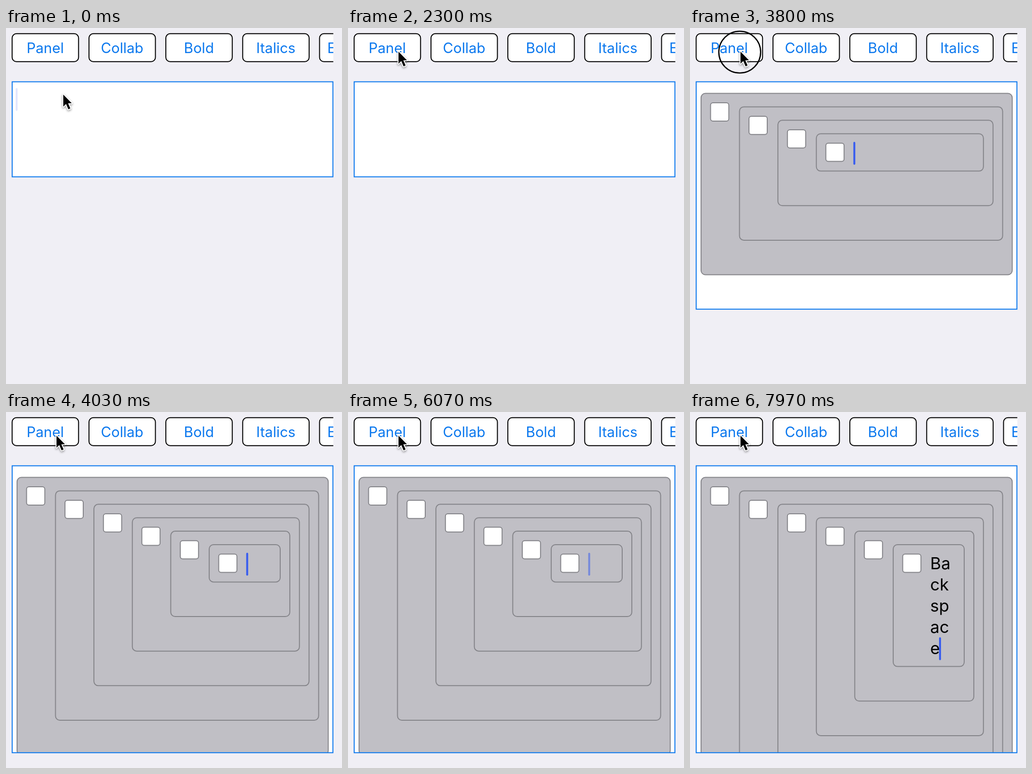
Recreate the animation shown at these times as an HTML page with a canvas. Size 696 by 738 pixels, loop 8 s.

```html
<!DOCTYPE html>
<html lang="en">
<head>
<meta charset="utf-8">
<title>Nested panels</title>
<style>
  html, body { margin: 0; width: 100%; height: 100%; overflow: hidden; background: #f0eff5; }
  canvas { display: block; width: 696px; height: 738px; }
</style>
</head>
<body>
<canvas id="stage" width="696" height="738"></canvas>
<script>
const ctx = document.getElementById('stage').getContext('2d');
const LOOP = 8000;
const FONT = 'Inter, Roboto, sans-serif';
const BLUE = '#0b78ee';
const LINE = 43.8;
const COLS = 2;

const WORD = 'Backspace';
const KEYS = [6530, 6580, 6630, 6680, 7080, 7220, 7360, 7500, 7640];
const CLICKS = [
  { down: 2330, up: 2380 }, { down: 3220, up: 3300 }, { down: 3450, up: 3530 },
  { down: 3630, up: 3700 }, { down: 3800, up: 3870 }, { down: 3940, up: 4000 }
];
const EDITS = [...CLICKS.map(c => c.up), ...KEYS];

const clamp = v => Math.max(0, Math.min(1, v));
const smooth = v => v * v * (3 - 2 * v);

function rounded(x, y, w, h, r, fill, stroke) {
  ctx.beginPath();
  ctx.roundRect(x, y, w, h, r);
  if (fill) {
    ctx.fillStyle = fill;
    ctx.fill();
  }
  ctx.strokeStyle = stroke;
  ctx.lineWidth = 2;
  ctx.stroke();
}

function text(str, x, y, size, color, align = 'left') {
  ctx.font = `${size}px ${FONT}`;
  ctx.fillStyle = color;
  ctx.textAlign = align;
  ctx.fillText(str, x, y);
}

function drawToolbar() {
  ctx.save();
  ctx.beginPath();
  ctx.rect(0, 0, 678, 100);
  ctx.clip();
  ['Panel', 'Collab', 'Bold', 'Italics', 'E'].forEach((label, i) => {
    const x = 12.7 + i * 159.2;
    rounded(x, 11.8, 137.6, 58, 9, '#fff', '#000');
    if (i < 4) text(label, x + 68.6, 51.5, 29.5, BLUE, 'center');
    else text(label, 665.5, 51.5, 29.5, BLUE);
  });
  ctx.restore();
}

// The caret stays solid after an edit, then fades out and in once a second.
function caretAlpha(t) {
  const last = EDITS.filter(e => e <= t).pop() ?? -1670;
  const age = t - last;
  const phase = age % 1000;
  if (phase >= 500) return 1 - clamp((phase - 500) / 200);
  return age < 1000 ? 1 : clamp(phase / 130);
}

function drawCaret(x, y, t) {
  ctx.globalAlpha = caretAlpha(t);
  ctx.fillStyle = '#375cef';
  ctx.beginPath();
  ctx.roundRect(x, y, 4, 47.4, 2);
  ctx.fill();
  ctx.globalAlpha = 1;
}

function drawEditor(t) {
  const depth = CLICKS.filter(c => t >= c.up).length;
  const typed = WORD.slice(0, KEYS.filter(k => t >= k).length);
  const rows = Math.max(1, Math.ceil(typed.length / COLS));
  const innerBottom = 135.7 + 27.9 * (depth - 1) + 77.2 + (rows - 1) * LINE;
  const outerBottom = innerBottom + (depth - 1) * 71.65;
  const bottom = depth ? Math.max(308.5, Math.min(706.3, outerBottom + 71.3)) : 308.5;

  ctx.fillStyle = '#fff';
  ctx.fillRect(12.7, 111.5, 664.6, bottom - 111.5);

  ctx.save();
  ctx.beginPath();
  ctx.rect(12.7, 111.5, 664.6, bottom - 111.5);
  ctx.clip();
  for (let i = 0; i < depth; i++) {
    const x = 22.9 + 79.6 * i;
    const y = 135.5 + 27.9 * i;
    const right = 667.5 - 19.9 * i;
    const end = innerBottom + (depth - 1 - i) * 71.65;
    rounded(x, y, right - x, end - y, 9, '#c0bfc5', '#85858a');
    rounded(x + 19.7, y + 19.6, 37.8, 37.8, 5, '#fff', '#85858a');
  }

  let x = depth ? 99.6 + 79.6 * (depth - 1) : 20;
  let y = depth ? 152.3 + 27.9 * (depth - 1) : 124.4;
  for (let r = 0; r < rows && typed; r++) {
    const part = typed.slice(r * COLS, r * COLS + COLS);
    text(part, 497.6, 326.4 + r * LINE, 34.5, '#000');
    if (r === rows - 1) {
      x = 495.8 + ctx.measureText(part).width;
      y += r * LINE;
    }
  }
  drawCaret(x, y, t);
  ctx.restore();

  ctx.strokeStyle = BLUE;
  ctx.lineWidth = 2;
  ctx.strokeRect(12.8, 111.5, 664.4, bottom - 111.5);
}

function drawPointer(t) {
  const k = smooth(clamp((t - 1900) / 370));
  ctx.save();
  ctx.translate(118 - 14 * k, 137.5 - 89 * k);
  if (CLICKS.some(c => t >= c.down && t < c.up)) {
    ctx.beginPath();
    ctx.arc(-1, 1.5, 43.3, 0, Math.PI * 2);
    ctx.strokeStyle = '#000';
    ctx.lineWidth = 2.6;
    ctx.stroke();
  }
  const arrow = new Path2D('M0.6 0.6V25.4L6.4 19.9L11.1 31L15.3 29.2L10.6 18.4H18.2Z');
  ctx.lineJoin = 'round';
  ctx.strokeStyle = '#fff';
  ctx.lineWidth = 4;
  ctx.shadowColor = 'rgba(0,0,0,.4)';
  ctx.shadowBlur = 4;
  ctx.shadowOffsetY = 2;
  ctx.stroke(arrow);
  ctx.shadowColor = 'transparent';
  ctx.fillStyle = '#000';
  ctx.fill(arrow);
  ctx.restore();
}

function draw(t) {
  ctx.fillStyle = '#f0eff5';
  ctx.fillRect(0, 0, 696, 738);
  drawToolbar();
  drawEditor(t);
  drawPointer(t);
}

const start = performance.now();
function tick() {
  draw((performance.now() - start) % LOOP);
  requestAnimationFrame(tick);
}
tick();
</script>
</body>
</html>
```
